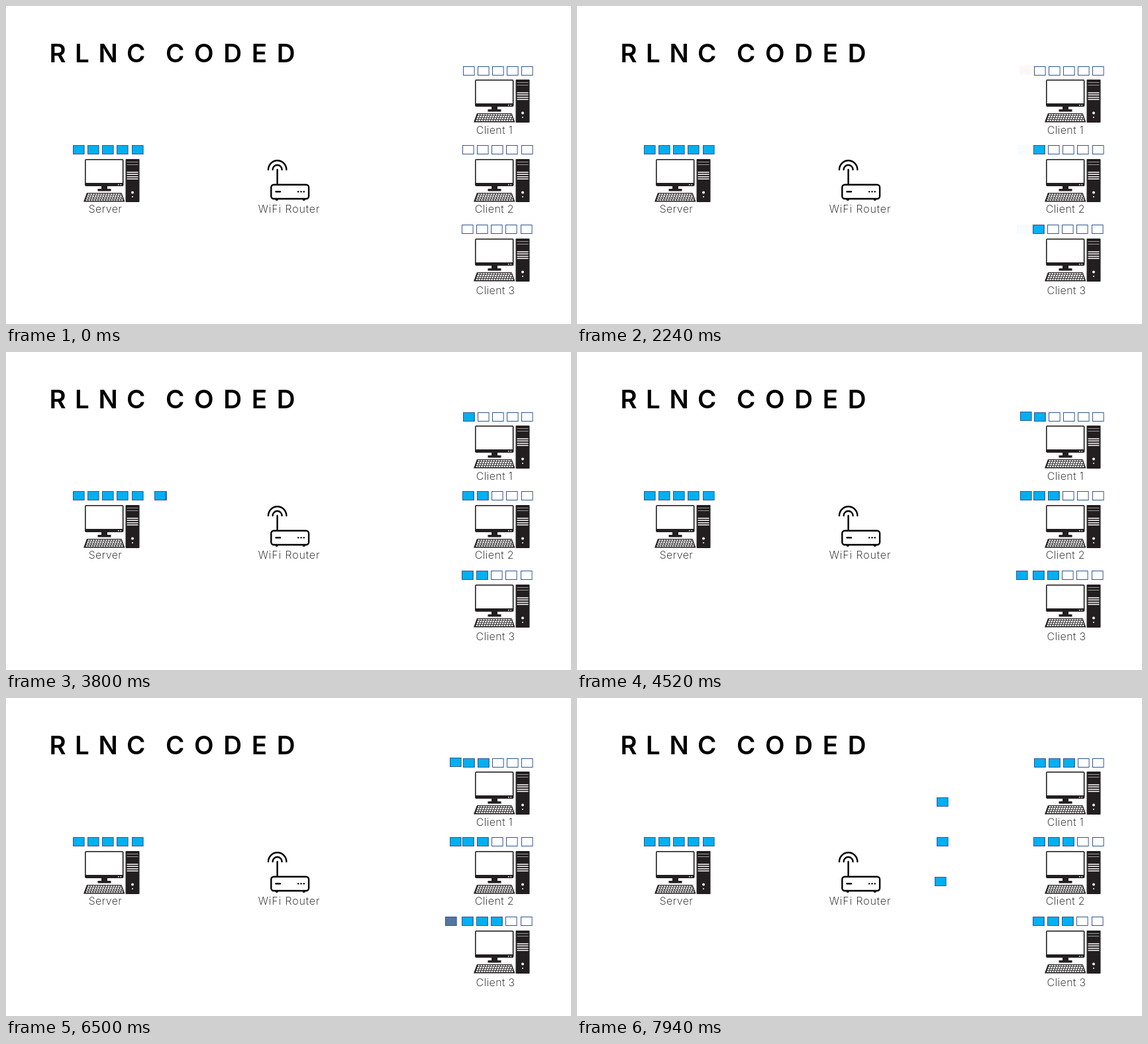
These frames come from a looping animation (853x480 px, 8 s). An HTML page:

```html
<!DOCTYPE html>
<html lang="en">
<head>
<meta charset="utf-8">
<title>RLNC coded</title>
<style>
  html, body { margin: 0; width: 100%; height: 100%; overflow: hidden; background: #fff; }
  svg { display: block; width: 100%; height: 100%; }
  text { font-family: Inter, "Open Sans", sans-serif; fill: #000; }
  .title { font-size: 38.5px; font-weight: 600; }
  .label { font-size: 16px; font-weight: 200; text-anchor: middle; }
  .box { stroke: #2f5597; stroke-width: 1; }
</style>
</head>
<body>
<svg viewBox="0 0 853 480">
  <defs>
    <g id="pc">
      <rect x="2" y="0" width="58.5" height="41" rx="2" fill="#231f20"/>
      <rect x="3.6" y="1.6" width="55.2" height="34.4" fill="#fff"/>
      <path d="M52 38.8h1.5M55.5 38.8h1.5" stroke="#fff" stroke-width="1.4"/>
      <path d="M27 41h9v4h5.5v3.4h-20V45H27z" fill="#231f20"/>
      <path d="M5 51H57.5L62.5 64.5H0z" fill="#231f20"/>
      <g stroke="#fff" stroke-width="1.9" stroke-dasharray="2.8 1">
        <path d="M6.5 53.2H57"/>
        <path d="M5.5 56H58"/>
        <path d="M4.5 58.8H59"/>
        <path d="M3.5 61.7H60"/>
      </g>
      <rect x="63.5" y="0" width="21" height="65" rx="1" fill="#231f20"/>
      <path d="M65.5 4.5h17M65.5 8.5h17" stroke="#aaa" stroke-width=".9"/>
      <path d="M65.5 20h17M65.5 23.3h17M65.5 26.7h17M65.5 30h17" stroke="#fff" stroke-width="1.6"/>
      <circle cx="74" cy="50.5" r="2" fill="#fff"/>
      <circle cx="74" cy="57" r="1" fill="#fff"/>
    </g>
  </defs>
  <rect width="853" height="480" fill="#fff"/>
  <text class="title" x="65.5" y="84.5" letter-spacing="13.5">RLNC</text>
  <text class="title" x="241" y="84.5" letter-spacing="14.7">CODED</text>

  <g fill="none" stroke="#000" stroke-width="2.4" stroke-linecap="round">
    <path d="M396 247a13.7 13.7 0 0 1 27.4 0M402.6 247a7 7 0 0 1 14 0M409.6 247V269"/>
    <rect x="400.3" y="269.8" width="56.8" height="21.2" rx="4"/>
    <path d="M407.5 280.3h6.5M408 292.5h1.5M449 292.5h1.5"/>
  </g>
  <g>
    <circle cx="441.2" cy="280.3" r="1.2"/>
    <circle cx="445.5" cy="280.3" r="1.2"/>
    <circle cx="449.8" cy="280.3" r="1.2"/>
  </g>

  <use href="#pc" x="117" y="231"/>
  <use href="#pc" x="706" y="111"/>
  <use href="#pc" x="706" y="231"/>
  <use href="#pc" x="706" y="351"/>
  <g letter-spacing=".4">
    <text class="label" x="150" y="312">Server</text>
    <text class="label" x="427.5" y="312" letter-spacing=".9">WiFi Router</text>
    <text class="label" x="737.5" y="193">Client 1</text>
    <text class="label" x="737.5" y="312">Client 2</text>
    <text class="label" x="739" y="435">Client 3</text>
  </g>
  <g id="boxes"></g>
</svg>
<script>
const LOOP = 8000, HOLD = 500, STEP = 60;
const LEG = 443, EFFECT = 462;
const PITCH = 22.1, ROUTER_X = 420, SERVER_X = 101.6, SERVER_Y = 210.5;
const BLUE = [0, 176, 240], RED = [255, 0, 0];

const clients = [{ x: 690, y: 91.5 }, { x: 689.6, y: 210.5 }, { x: 688.6, y: 330.5 }];

// ends: resting x beside each client; lost: index of the client that misses the packet
const packets = [
  { start: 443, lost: 0, ends: [668.5, 666.5, 664.5] },
  { start: 2255, lost: -1, ends: [668.5, 668.5, 663.5] },
  { start: 3631, lost: 1, ends: [669.5, 669.5, 663.5] },
  { start: 5460, lost: 2, ends: [670.5, 670.5, 663.5] },
  { start: 7276, lost: -1, ends: [668.5, 668.5, 663.5] }
];

const layer = document.getElementById("boxes");
const clamp = v => Math.min(1, Math.max(0, v));
const ease = u => u < .5 ? 2 * u * u : 1 - 2 * (1 - u) ** 2;
const lerp = (a, b, u) => a + (b - a) * u;
const mix = u => `rgb(${BLUE.map((c, i) => Math.round(lerp(c, RED[i], u)))})`;
const snap = v => Math.floor(v) + .5;
const slotX = (left, i) => snap(left + i * PITCH);

function addBox(x, y, fill) {
  const el = document.createElementNS("http://www.w3.org/2000/svg", "rect");
  const attrs = { class: "box", x, y, width: 16.6, height: 13, fill };
  for (const k in attrs) el.setAttribute(k, attrs[k]);
  layer.append(el);
  return el;
}

for (let i = 0; i < 5; i++) {
  addBox(slotX(SERVER_X, i), SERVER_Y, mix(0));
  for (const c of clients) addBox(slotX(c.x, i), c.y, "#fff");
}

const received = [0, 0, 0];
packets.forEach((p, n) => {
  p.from = slotX(SERVER_X, 4 - n);
  p.slots = clients.map((c, i) =>
    i === p.lost ? null : addBox(slotX(c.x, received[i]++), c.y, mix(0)));
});
for (const p of packets) p.copies = clients.map(() => addBox(p.from, SERVER_Y, mix(0)));

function draw(t) {
  for (const p of packets) {
    const age = t - p.start;
    const leg1 = ease(clamp(age / LEG)), leg2 = ease(clamp(age / LEG - 1));
    const landed = age - 2 * LEG;
    const red = p.lost < 0 ? 0 : clamp(landed / EFFECT);
    const done = clamp(landed / EFFECT - (p.lost < 0 ? 0 : 1));
    p.copies.forEach((el, i) => {
      const hub = ROUTER_X - (i === 2 ? 2 : 0);
      const x = leg2 > 0 ? lerp(hub, p.ends[i], leg2) : lerp(p.from, hub, leg1);
      el.setAttribute("x", snap(x));
      el.setAttribute("y", snap(lerp(SERVER_Y, clients[i].y - (i === 0 ? 1 : 0), leg2)));
      el.setAttribute("fill", mix(i === p.lost ? red : 0));
      el.setAttribute("opacity", age < 0 ? 0 : 1 - done);
      if (p.slots[i]) p.slots[i].setAttribute("opacity", done);
    });
  }
}

const origin = performance.now();
function tick() {
  const t = (performance.now() - origin) % LOOP;
  draw(t < HOLD ? 0 : HOLD + Math.floor((t - HOLD) / STEP) * STEP);
  requestAnimationFrame(tick);
}
tick();
</script>
</body>
</html>
```
